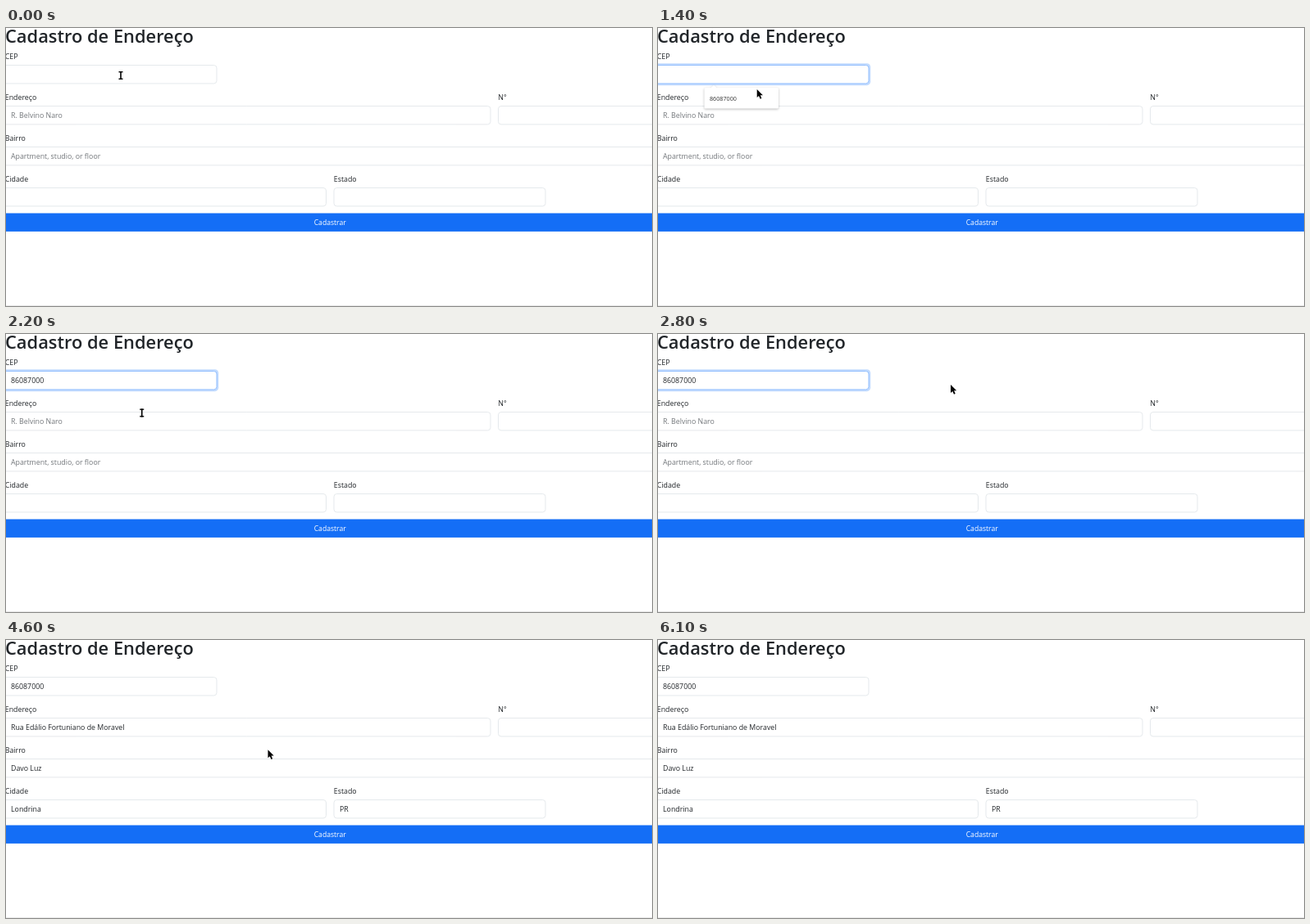
These frames come from a looping animation (788x340 px, 6800 ms). An HTML page with a canvas:

```html
<!DOCTYPE html>
<html lang="pt-BR">
<head>
<meta charset="utf-8">
<title>Cadastro de Endereço</title>
<style>
  html, body { margin: 0; width: 100%; height: 100%; overflow: hidden; background: #fff; }
  canvas { display: block; }
</style>
</head>
<body>
<canvas id="stage" width="788" height="340"></canvas>
<script>
const canvas = document.getElementById('stage');
const ctx = canvas.getContext('2d');
const { width: WIDTH, height: HEIGHT } = canvas;
const LOOP = 6800, STEP = 100;
const SANS = '"Open Sans", "Noto Sans", sans-serif';
const INK = '#212529', MUTED = '#73777b', BORDER = '#e1e5e9', BLUE = '#146ef6';
const CEP = '86087000';

// Form moments in ms
const FOCUS = 900, MENU = 1100, HOVER = 1500, PICK = 2100, BLUR = 3000, FILLED = 3200;

// Layout: rows share one pitch, columns one gutter
const PITCH = 50, FIELD_H = 22.4, LEFT = -8, GUTTER = 9.5;
const STREET_END = 591, CITY_END = 390.5, OFFSTAGE = WIDTH + 20;
const fieldTop = row => 45.5 + row * PITCH;

const cepField = { label: 'CEP', row: 0, left: LEFT, right: 257 };
const fields = [
  cepField,
  { label: 'Endereço', row: 1, left: LEFT, right: STREET_END,
    hint: 'R. Belvino Naro', value: 'Rua Edálio Fortuniano de Moravel' },
  { label: 'N°', row: 1, left: STREET_END + GUTTER, right: OFFSTAGE },
  { label: 'Bairro', row: 2, left: LEFT, right: OFFSTAGE,
    hint: 'Apartment, studio, or floor', value: 'Davo Luz' },
  { label: 'Cidade', row: 3, left: LEFT, right: CITY_END, value: 'Londrina' },
  { label: 'Estado', row: 3, left: CITY_END + GUTTER, right: 658, value: 'PR' }
];

// Each gesture glides to (x, y), sagging by `sag` midway; the pointer rests in between
const home = { x: 140, y: 58 };
const gestures = [
  { from: MENU, until: 1800, x: 95, y: 84, sag: 6 },
  { from: PICK, until: 2500, x: 378, y: 100, sag: 12 },
  { from: 2500, until: 2800, x: 357, y: 62, sag: 0 },
  { from: 2800, until: 3400, x: 350, y: 66, sag: 0 },
  { from: 3400, until: 4600, x: 319.5, y: 134.3, sag: 0 },
  { from: 4700, until: 5400, x: 367, y: 62, sag: 12 },
  { from: 5400, until: 5800, x: 360, y: -16, sag: 0 }
];

const between = (t, a, b) => t >= a && t < b;
const menuOpen = t => between(t, MENU, PICK);

function pointerAt(t) {
  let { x, y } = home;
  for (const g of gestures) {
    const k = Math.min(1, Math.max(0, (t - g.from) / (g.until - g.from)));
    x += (g.x - x) * k;
    y += (g.y - y) * k + g.sag * Math.sin(Math.PI * k);
  }
  return { x, y };
}

function text(str, x, y, { color = INK, size = 8.8, weight = 400, family = SANS, align = 'left' } = {}) {
  ctx.font = `${weight} ${size}px ${family}`;
  ctx.fillStyle = color;
  ctx.textAlign = align;
  ctx.fillText(str, x, y);
}

function rect(color, x, y, w, h) {
  ctx.fillStyle = color;
  ctx.fillRect(x, y, w, h);
}

function drawBox({ left, right, row }, fill, stroke, grow = 0) {
  ctx.beginPath();
  ctx.roundRect(left - grow, fieldTop(row) - grow, right - left + 2 * grow, FIELD_H + 2 * grow, 3.5 + grow / 2);
  ctx.fillStyle = fill;
  ctx.fill();
  if (!stroke) return;
  ctx.strokeStyle = stroke;
  ctx.lineWidth = 0.85;
  ctx.stroke();
}

const insideField = ({ x, y }) => fields.some(f =>
  between(x, f.left, f.right) && between(y, fieldTop(f.row), fieldTop(f.row) + FIELD_H));

function drawField(field, t) {
  const { label, row, left, hint, value } = field;
  const base = fieldTop(row) + 14.8;
  const textX = Math.max(left + 7, 6);
  text(label, Math.max(left, -1) - 0.2, base - 22.5);
  drawBox(field, '#fff', BORDER);
  if (value && t >= FILLED) text(value, textX, base);
  else if (hint) text(hint, textX, base, { color: MUTED });
}

function drawCepState(t) {
  const preview = between(t, HOVER, PICK);
  if (between(t, FOCUS, BLUR)) {
    drawBox(cepField, '#c2dbfe', null, 2.3);
    drawBox(cepField, preview ? '#e8f0fe' : '#fff', '#86b7fe');
  }
  if (preview) text(CEP, 6.5, 60.3, { color: '#000', size: 7.8, family: '"Liberation Sans", Arial, sans-serif' });
  if (t >= PICK) text(CEP, 6, 60.3);
  const caretOn = between(t, FOCUS, PICK) && t % 600 >= 400;
  if (caretOn) rect('#000', 6, 51.5, 0.8, 11.5);
}

function drawMenu(t) {
  const left = 56.5, top = 73, width = 90.5;
  ctx.save();
  ctx.shadowColor = 'rgba(0,0,0,.28)';
  ctx.shadowBlur = 3;
  ctx.shadowOffsetY = 1;
  ctx.beginPath();
  ctx.roundRect(left, top, width, 25.5, 1.5);
  ctx.moveTo(left + 8, top);
  ctx.lineTo(left + 11.5, top - 3);
  ctx.lineTo(left + 15, top);
  ctx.fillStyle = '#fff';
  ctx.fill();
  ctx.restore();
  if (t >= HOVER) rect('#e5e5e5', left, top + 2.5, width, 21);
  text(CEP, 63, 88.8, { color: '#333', size: 7.2 });
}

const arrow = new Path2D('M0 0V10L2.3 8 4 11.7 5.7 11 4.1 7.3H7.2Z');

function drawArrow({ x, y }) {
  ctx.save();
  ctx.translate(x, y);
  ctx.strokeStyle = '#fff';
  ctx.lineWidth = 1;
  ctx.stroke(arrow);
  ctx.fillStyle = '#000';
  ctx.fill(arrow);
  ctx.restore();
}

function drawBeam({ x, y }) {
  rect('#000', x - 0.8, y - 5, 1.6, 10);
  for (const end of [y - 5, y + 3.6]) rect('#000', x - 2.5, end, 5, 1.4);
}

function drawPointer(t) {
  const at = pointerAt(t);
  if (insideField(at)) drawBeam(at);
  else drawArrow(at);
}

function render(now) {
  const t = Math.floor((now % LOOP) / STEP) * STEP;
  rect('#fff', 0, 0, WIDTH, HEIGHT);
  text('Cadastro de Endereço', -1, 18, { size: 21.85, weight: 600 });
  for (const field of fields) drawField(field, t);
  drawCepState(t);
  rect(BLUE, 0, 226.5, WIDTH, FIELD_H);
  text('Cadastrar', 395.2, 241.3, { color: '#fff', size: 8.6, align: 'center' });
  rect('#ececec', 0, HEIGHT - 1, WIDTH, 1);
  if (menuOpen(t)) drawMenu(t);
  drawPointer(t);
}

const start = performance.now();
function tick() {
  render(performance.now() - start);
  requestAnimationFrame(tick);
}
tick();
</script>
</body>
</html>
```
